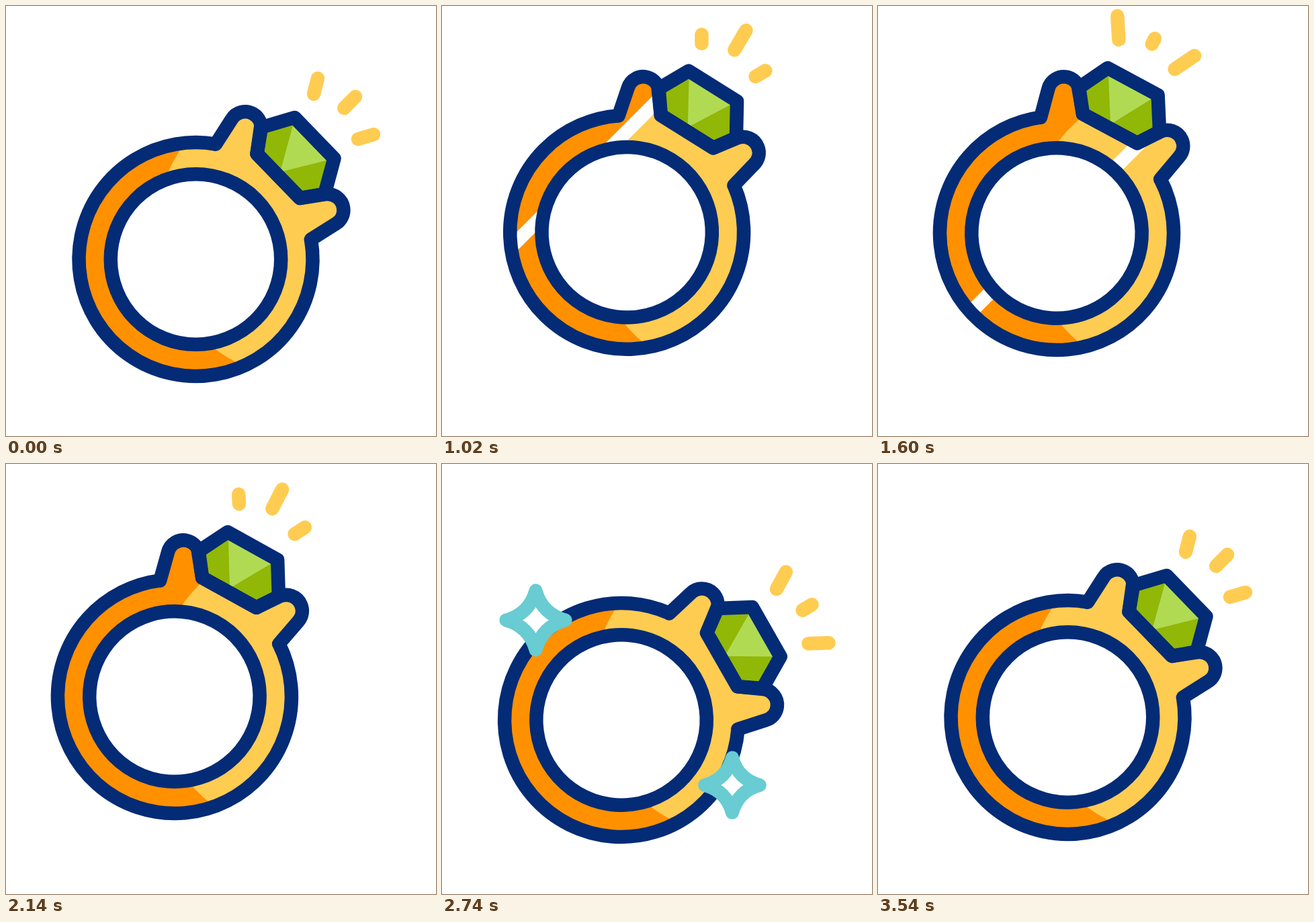
An HTML page with a canvas that plays this animation: 640 px wide and 640 px high, repeating every 3600 ms.

```html
<!DOCTYPE html>
<html lang="en">
<head>
<meta charset="utf-8">
<title>Sparkling ring</title>
<style>
  html, body { margin: 0; width: 100%; height: 100%; overflow: hidden; background: #fff; }
  canvas { display: block; width: 640px; height: 640px; }
</style>
</head>
<body>
<canvas id="stage" width="640" height="640"></canvas>
<script>
const ctx = document.getElementById('stage').getContext('2d');
const LOOP = 3600, LINE = 20.5, RAD = Math.PI / 180;
const NAVY = '#042b76', YELLOW = '#ffcc52', ORANGE = '#ff9100', TEAL = '#68ccd2';
const GREEN = '#91b707', LIME = '#b1da53';

// time, centre x, centre y, rotation in degrees
const POSES = [
  [0, 282.5, 377, 0], [100, 282.5, 377, 0], [300, 284.3, 366.3, -3.2],
  [440, 284.6, 352.4, -6.5], [540, 284, 343.6, -9], [580, 283.5, 340.5, -9.95],
  [720, 281.5, 337.5, -11.8], [1020, 275.2, 336.8, -13.9], [1600, 266, 338, -17.7],
  [1850, 260.5, 340, -18.4], [2040, 256, 342.5, -18], [2140, 251, 346, -17],
  [2200, 245.5, 351, -15.5], [2360, 237.6, 369.5, -6], [2540, 245, 385, 4.2],
  [2700, 262.8, 384, 12.2], [2740, 267, 381, 14.3], [2880, 275, 378.5, 19],
  [3240, 279.5, 377.5, 5.4], [3540, 282.5, 377, 0], [3600, 282.5, 377, 0]
];

// inner end, direction in degrees, lengths at rest / first / second extreme
const RAYS = [
  { x: 175.5, y: -246, angle: -75.6, rest: 24, a: 36, b: 13 },
  { x: 220.7, y: -225, angle: -45.5, rest: 24, a: 8.5, b: 34 },
  { x: 241.5, y: -179, angle: -16.4, rest: 24, a: 36, b: 17 }
];
const RAY_TIMES = [0, 555, 1055, 1555, 2055, 2555, 3055, 3540];

const clamp = v => Math.max(0, Math.min(1, v));
const ease = v => (1 - Math.cos(Math.PI * clamp(v))) / 2;
const mix = (a, b, k) => a + (b - a) * k;

function polygon(points) {
  const path = new Path2D();
  points.forEach(([x, y]) => path.lineTo(x, y));
  path.closePath();
  return path;
}

function makeBand() {
  const path = new Path2D();
  path.moveTo(29.5, -171.2);
  path.arc(73.5, -196, 23.7, -149.3 * RAD, 7.7 * RAD);
  path.lineTo(91, -157);
  path.lineTo(155, -91);
  path.arc(196.2, -73.3, 23.7, -97.7 * RAD, 59.3 * RAD);
  path.lineTo(171.2, -29.5);
  path.arc(0, 0, 174, -9.8 * RAD, 279.8 * RAD);
  path.closePath();
  path.moveTo(126.75, 0);
  path.arc(0, 0, 126.75, 0, 2 * Math.PI);
  path.closePath();
  return path;
}

const band = makeBand();
const gem = polygon([[96.5, -196], [147, -211], [206, -150], [191.8, -97.5], [155, -91], [91, -157]]);
const facet = polygon([[147.8, -211], [206, -150], [125.5, -130]]);

function poseAt(t) {
  let i = 0;
  while (i < POSES.length - 2 && t >= POSES[i + 1][0]) i++;
  const p = POSES[i], q = POSES[i + 1];
  const before = POSES[Math.max(0, i - 1)], after = POSES[Math.min(POSES.length - 1, i + 2)];
  const span = q[0] - p[0], u = (t - p[0]) / span, u2 = u * u, u3 = u2 * u;
  return [1, 2, 3].map(k => {
    const m0 = (q[k] - before[k]) / (q[0] - before[0]) * span;
    const m1 = (after[k] - p[k]) / (after[0] - p[0]) * span;
    return p[k] * (2 * u3 - 3 * u2 + 1) + m0 * (u3 - 2 * u2 + u)
      + q[k] * (3 * u2 - 2 * u3) + m1 * (u3 - u2);
  });
}

function rayLength(ray, t) {
  const last = RAY_TIMES.length - 1;
  const value = i => i === 0 || i === last ? ray.rest : i % 2 ? ray.a : ray.b;
  let i = 0;
  while (i < last - 1 && t >= RAY_TIMES[i + 1]) i++;
  const k = ease((t - RAY_TIMES[i]) / (RAY_TIMES[i + 1] - RAY_TIMES[i]));
  return mix(value(i), value(i + 1), k);
}

function stroke(path, color, width) {
  ctx.strokeStyle = color;
  ctx.lineWidth = width;
  ctx.stroke(path);
}

function fill(path, color) {
  ctx.fillStyle = color;
  ctx.fill(path);
}

function drawGlint(t, cx, cy) {
  for (const start of [866, 1362]) {
    const u = (t - start) / 490;
    if (u <= 0 || u >= 1) continue;
    ctx.save();
    ctx.rotate(45 * RAD);
    ctx.fillStyle = '#fff';
    ctx.fillRect((cx + cy + mix(-290, 262, ease(u))) / Math.SQRT2, -640, 20.3, 1280);
    ctx.restore();
  }
}

// The light and the glint stay upright while the metal turns.
function drawMetal(t, cx, cy, place) {
  ctx.save();
  place();
  ctx.clip(band, 'evenodd');
  ctx.setTransform(1, 0, 0, 1, 0, 0);
  ctx.fillStyle = ORANGE;
  ctx.fillRect(0, 0, 640, 640);
  const light = new Path2D();
  light.arc(442, 335, 219, 0, 2 * Math.PI);
  fill(light, YELLOW);
  drawGlint(t, cx, cy);
  ctx.restore();
}

function drawRay(ray, t) {
  const len = rayLength(ray, t), path = new Path2D();
  path.moveTo(ray.x, ray.y);
  path.lineTo(ray.x + len * Math.cos(ray.angle * RAD), ray.y + len * Math.sin(ray.angle * RAD));
  stroke(path, YELLOW, LINE);
}

function drawStar(x, y, size) {
  if (size < 0.02) return;
  const tip = 44.5 * size, dent = 9.5 * size, path = new Path2D();
  path.moveTo(x, y - tip);
  path.quadraticCurveTo(x + dent, y - dent, x + tip, y);
  path.quadraticCurveTo(x + dent, y + dent, x, y + tip);
  path.quadraticCurveTo(x - dent, y + dent, x - tip, y);
  path.quadraticCurveTo(x - dent, y - dent, x, y - tip);
  path.closePath();
  fill(path, '#fff');
  stroke(path, TEAL, 20 * Math.min(1, size * 2));
}

function starSize(t, start) {
  return 1.06 * ease((t - start) / 330) * (1 - ease((t - start - 380) / 320));
}

function draw(t) {
  const [cx, cy, turn] = poseAt(t);
  const place = () => {
    ctx.translate(cx, cy);
    ctx.rotate(turn * RAD);
  };
  ctx.setTransform(1, 0, 0, 1, 0, 0);
  ctx.fillStyle = '#fff';
  ctx.fillRect(0, 0, 640, 640);
  ctx.lineJoin = ctx.lineCap = 'round';

  drawMetal(t, cx, cy, place);
  ctx.save();
  place();
  fill(gem, GREEN);
  fill(facet, LIME);
  stroke(gem, NAVY, LINE);
  stroke(band, NAVY, LINE);
  RAYS.forEach(ray => drawRay(ray, t));
  ctx.restore();

  drawStar(139.5, 232.5, starSize(t, 2465));
  drawStar(432, 478, starSize(t, 2490));
}

const begin = performance.now();
function tick() {
  draw((performance.now() - begin) % LOOP);
  requestAnimationFrame(tick);
}
tick();
</script>
</body>
</html>
```
